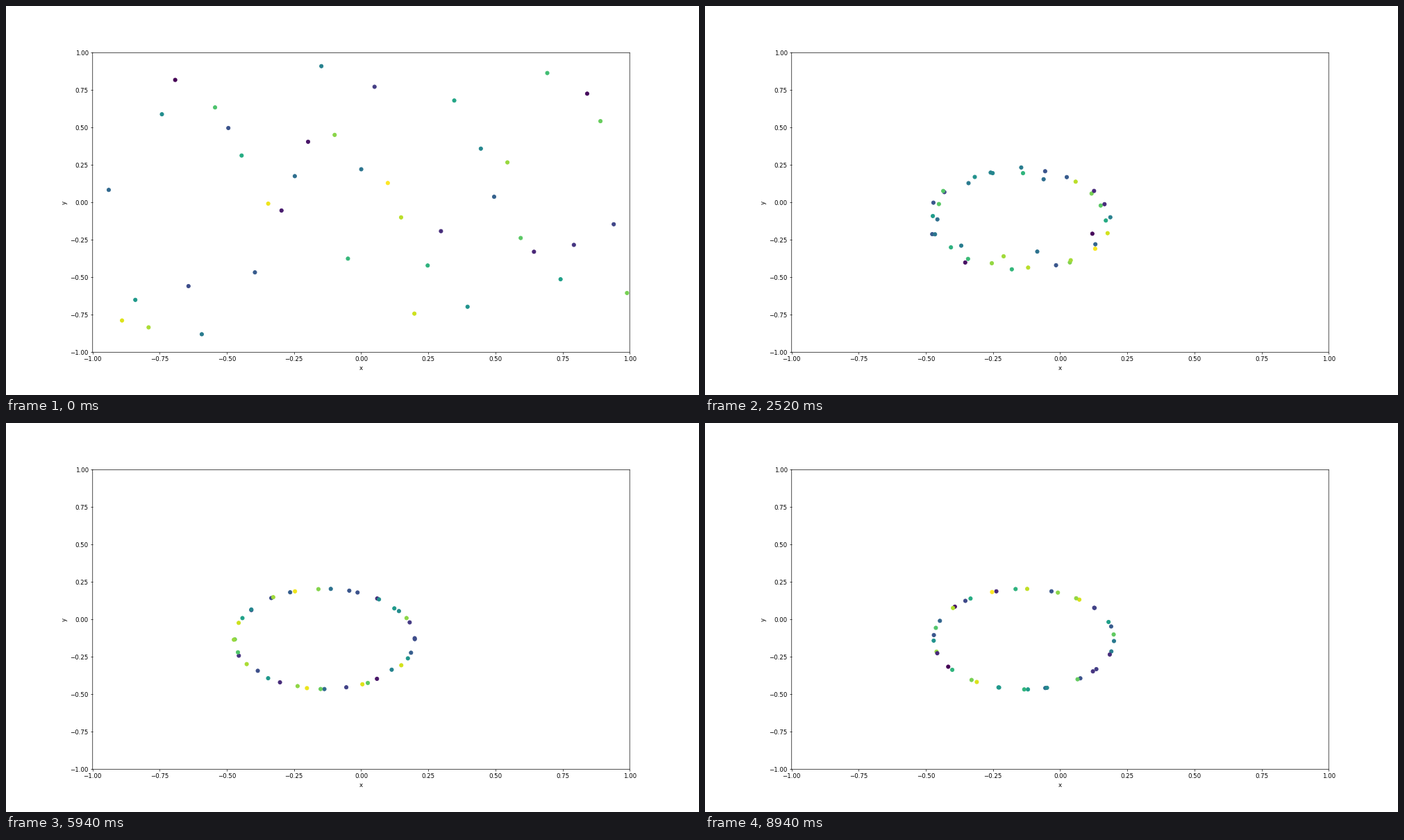
Write a matplotlib script that moves like this. It is 998x561 px and loops after 9000 ms.

```python
import numpy as np
import matplotlib.pyplot as plt
from matplotlib.animation import FuncAnimation

W, H, DPI = 998, 561, 62.375
FRAMES, STEP = 150, 60
N = 40
RADIUS = 0.336
SPIN = 2 * np.pi / 52      # radians per frame

rng = np.random.default_rng(7)


def spread():
    """Evenly spaced values from 0 to 1 in random order."""
    return rng.permutation(np.linspace(0, 1, N))


def fade(i, frames):
    return np.exp(-i / frames)


def center(i):
    return np.array([-0.135, -0.132]) + np.array([-0.05, 0.07]) * fade(i, 28)


# scattered start, sorted by direction so each dot falls to the near side
start = np.column_stack([-0.94 + 1.93 * spread(), -0.88 + 1.79 * spread()])
away = start - center(0)
start = start[np.argsort(np.arctan2(away[:, 1], away[:, 0]) % (2 * np.pi))]

# neighbours on the ring circle in opposite directions
angle = 2 * np.pi * (np.arange(N) + rng.random(N)) / N
turn = np.where(np.arange(N) % 2, 1, -1)
dip = 1.6 * spread() ** 8
wobble = rng.normal(0, 0.15, N)
hue = spread()
drift = rng.uniform(0.012, 0.05, N)


def ring(i):
    a = angle + turn * SPIN * i
    r = RADIUS * (1 + wobble * fade(i, 28) - dip * fade(i, 25))
    return center(i) + np.column_stack([r * np.cos(a), r * np.sin(a)])


def places(i):
    return ring(i) + (start - ring(0)) * fade(i, 4.8)


def levels(i):
    # up and down the colour map
    return np.abs((hue + drift * i + 1) % 2 - 1)


fig, ax = plt.subplots(figsize=((W + 0.01) / DPI, (H + 0.01) / DPI), dpi=DPI)
ax.set(xlim=(-1, 1), ylim=(-1, 1), xlabel="x", ylabel="y")
for spine in ax.spines.values():
    spine.set_snap(False)
dots = ax.scatter(*places(0).T, c=levels(0), cmap="viridis", vmin=0, vmax=1)


def draw(i):
    dots.set_offsets(places(i))
    dots.set_array(levels(i))
    return (dots,)


anim = FuncAnimation(fig, draw, frames=FRAMES, interval=STEP,
                     init_func=lambda: draw(0), repeat=True, repeat_delay=0)
plt.show()
```
